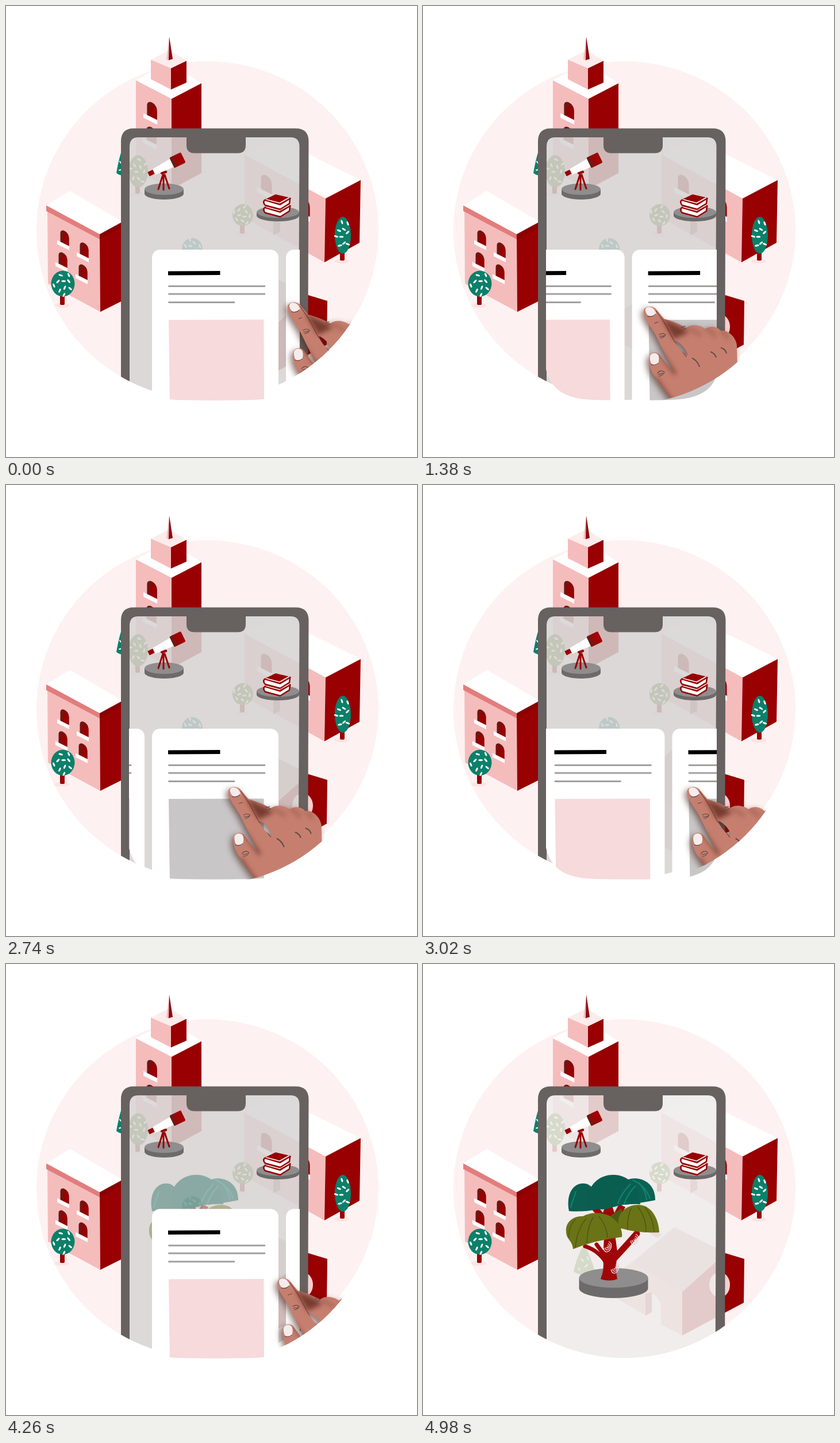
These frames come from a looping animation (715x783 px, 6.68 s). An HTML page with a canvas:

```html
<!DOCTYPE html>
<html lang="en">
<head>
<meta charset="utf-8">
<title>Campus on a phone</title>
<style>
html, body { margin: 0; width: 100%; height: 100%; overflow: hidden; background: #fff; }
canvas { display: block; width: 715px; height: 783px; }
</style>
</head>
<body>
<canvas id="stage" width="715" height="783"></canvas>
<script>
const W = 715, H = 783, LOOP = 6680;
const RED = '#980002', PINK = '#f5bcbc', TEAL = '#0b806a', OLIVE = '#3f6800', FRAME = '#676160', SKIN = '#c67f6f';
const stage = document.getElementById('stage').getContext('2d');
let g = stage;

// ---- helpers ----
const fill = (color, d, rule) => { g.fillStyle = color; g.fill(new Path2D(d), rule || 'nonzero'); };
const poly = (color, pts) => fill(color, 'M' + pts + 'Z');
const line = (color, width, d) => {
  g.strokeStyle = color; g.lineWidth = width; g.lineCap = g.lineJoin = 'round';
  g.stroke(new Path2D(d));
};
const oval = (color, x, y, rx, ry, rot = 0) => {
  g.fillStyle = color; g.beginPath(); g.ellipse(x, y, rx, ry, rot, 0, 7); g.fill();
};
const box = (color, x, y, w, h, r = 0) => {
  g.fillStyle = color; g.beginPath(); g.roundRect(x, y, w, h, r); g.fill();
};
const group = draw => { g.save(); draw(); g.restore(); };
const clipDisc = (dy = 0) => {
  g.beginPath(); g.ellipse(350.5, 390 + dy, 297.5, 294, 0, 0, 7); g.clip();
};
const layer = draw => {
  const c = document.createElement('canvas');
  c.width = W; c.height = H;
  g = c.getContext('2d'); draw(); g = stage;
  return c;
};
const rng = seed => () => (seed = (seed * 16807) % 2147483647) / 2147483647;

const quad = p => p < .5 ? 2 * p * p : 1 - 2 * (1 - p) ** 2;
const cubic = p => p < .5 ? 4 * p ** 3 : 1 - 4 * (1 - p) ** 3;
const smooth = p => p * p * (3 - 2 * p);
const prog = (t, a, b, ease = smooth) => ease(Math.min(1, Math.max(0, (t - a) / (b - a))));

// ---- scenery ----
function arch(x, y, s = 1) {
  group(() => {
    g.transform(s, .5 * s, 0, s, x, y);
    fill('#6f1510', 'M-7.5 11V-6A7.5 7.5 0 0 1 7.5 -6V11Z');
    fill(RED, 'M-3 11V-5Q-2 -9 3 -10Q7.5 -8 7.5 -4V11Z');
    box('#fff', -13, 9, 21, 7);
  });
}

function plant(color, x, y, rx, ry, foot, seed) {
  oval('#fde3e3', x - 2, foot + 1, 13, 4);
  box(RED, x - 5, y + ry - 4, 8, foot - y - ry + 4, 2);
  oval(color, x, y, rx, ry);
  const rand = rng(seed);
  for (let i = 0; i < 10; i++) {
    const a = i * 2.4 + seed, r = .9 * Math.sqrt((i + .5) / 10);
    const px = x + Math.cos(a) * rx * r, py = y + Math.sin(a) * ry * r;
    oval('#fff', px, py, 3.8, 1.6, rand() * 3);
  }
}

function tower() {
  poly(PINK, '226,129 288,161 288,318 226,286');
  poly(RED, '288,161 340,134 340,290 288,318');
  poly('#fff', '226,129 284,98 340,134 288,161');
  poly(PINK, '252,93 287,108 287,145 252,127');
  poly(RED, '287,108 314,95 314,133 287,145');
  poly('#fdecec', '252,93 284,77 314,95 287,108');
  poly(PINK, '284,54 279,93 284,95');
  poly('#8c0a10', '284,53 283,94 290,92');
  arch(254, 183, 1.15);
  arch(253, 226, 1.15);
}

function leftHouse() {
  poly(PINK, '72,352 163,400 164,531 73,482');
  poly(RED, '163,400 202,380 202,512 164,531');
  poly('#e27d7d', '70,346 163,396 163,405 70,356');
  poly('#8a0002', '163,396 202,375 202,384 163,405');
  poly('#fff', '70,346 111,321 202,374 163,396');
  [[102, 404], [136, 425], [99, 442], [134, 463]].forEach(p => arch(...p));
}

function rightHouse() {
  poly(PINK, '415,258 556,334 554,445 415,368');
  poly(RED, '556,334 617,302 615,411 554,445');
  poly('#fff', '415,258 472,228 526,257 617,302 556,334');
  arch(453, 311, 1.25);
  arch(519, 350, 1.25);
  poly('#b05a5a', '465,370 477,376 477,392 465,398');
}

function lowHouse() {
  poly('#d08080', '398,459 416,470 408,476 392,466');
  poly('#e6b0ae', '330,540 366,516 451,569 451,645 414,626 414,592 Q405,566 387,573 L387,610 332,578');
  poly('#a84848', '387,573 398,570 398,604 387,611');
  poly(RED, '451,569 526,502 559,512 558,588 451,645');
  poly('#cfa29e', '364,518 437,457 526,501 451,569');
  oval('#f8cfcf', 516, 557, 18, 22);
}

const scenery = layer(() => {
  oval('#fef1f1', 350.5, 390, 297.5, 294);
  tower();
  fill(TEAL, 'M207 236Q198 255 192 290Q202 298 220 292Z');
  line('#fff', 2, 'M198 270l3 4M197 285l4 -1');
  leftHouse();
  rightHouse();
  lowHouse();
  plant(TEAL, 99, 482, 20.5, 22.5, 519, 5);
  plant(TEAL, 586, 398, 14, 32, 442, 9);
  plant(OLIVE, 230, 287, 17, 28, 326, 3);
  plant(OLIVE, 412, 363, 18, 19, 395, 7);
  plant(TEAL, 324, 422, 18, 19, 450, 8);
  fill(OLIVE, 'M280 486Q266 512 262 534Q280 546 299 534Q292 508 280 486Z');
  line('#fff', 2, 'M275 512l4 4M282 526l4 -4M270 528l3 3M286 508l2 5');
});

const SCREEN = new Path2D('M214 660V243Q214 227 230 227H495Q511 227 511 243L510 690H214Z');

const frame = layer(() => {
  clipDisc();
  fill(FRAME, 'M200 700V235Q200 212.5 222 212.5H504Q526.5 212.5 526.5 235L525 700ZM215 700H508.5L510.5 244Q510.5 228 495 228H230Q215 228 215 244Z', 'evenodd');
  fill(FRAME, 'M314 226V242Q314 255.5 328 255.5H403Q417 255.5 417 242V226Z');
});

// ---- exhibits ----
function plinth(x, y, rx, ry, h) {
  fill('#6c6a6a', `M${x - rx} ${y}V${y + h}A${rx} ${ry} 0 0 0 ${x + rx} ${y + h}V${y}Z`);
  oval('#8f8d8d', x, y, rx, ry);
}

function telescope() {
  plinth(275, 318, 34, 10, 8);
  line(RED, 3, 'M273 293L265 318M274 293V319M276 293L284 317');
  line(RED, 4.5, 'M271 290L278 288');
  group(() => {
    g.translate(275, 279);
    g.rotate(-.45);
    box(RED, -30, -4, 12, 8, 1);
    poly('#fff', '-20,-5 17,-8 17,8 -20,6');
    const shade = g.createLinearGradient(15, 0, 26, 0);
    shade.addColorStop(0, '#5f2015');
    shade.addColorStop(1, '#a00306');
    box(shade, 15, -10, 22, 20, 2);
  });
}

function books() {
  plinth(473, 358, 37, 10, 6);
  [13, 0].forEach(dy => group(() => {
    g.translate(0, dy);
    poly('#fff', '450,337 477,345 494,335 494,343 477,353 450,346');
    line(RED, 2.5, 'M494 335L493 343L477 353L451 346Q446 341 450 337');
    poly(RED, '450,336 469,327 495,333 477,344');
    line('#fff', 1.5, 'M453 336L476 342L492 333');
    line(RED, 2, 'M450 337L477 345L495 334');
  }));
}

const bigTree = layer(() => {
  plinth(331.5, 545, 60, 17, 18);
  const bark = '#a00509';
  fill(bark, 'M309 547Q316 530 313 512L315 474L334 470L339 506Q333 525 338 547Q324 552 309 547Z');
  fill(bark, 'M288 420L301 417L313 432L317 420H329L333 432L341 417L352 422L340 446L334 478H314L306 440Z');
  line(bark, 7, 'M318 518Q306 498 282 490M316 506L302 487');
  line(bark, 11, 'M332 512Q348 495 372 468');
  fill('#0b5e50', 'M254 429C248 396 264 380 279 381C296 381 304 400 302 426Q280 431 254 429Z');
  fill('#0b6153', 'M340 395C345 375 362 369 380 374C398 380 404 395 404 410Q380 415 350 418Z');
  fill('#0a5e50', 'M285 414C286 385 305 366 331 366C360 366 378 390 378 417Q350 416 331 422Q300 433 285 414Z');
  line('#0e8672', 2, 'M361 382Q345 398 339 416M369 386Q355 400 350 417M376 380Q388 395 389 409M365 375Q386 384 395 407M266 395L257 422');
  fill('#4f5912', 'M322 440L345 424L352 452L342 462Z');
  fill('#6b7317', 'M261 495C260 480 249 478 249 465C247 447 263 437 278 438C292 430 310 431 324 437C340 446 348 462 346 474Q300 479 261 495Z');
  fill('#6b7317', 'M341 458C335 436 350 418 376 418C400 420 410 445 411 466Q374 468 341 458Z');
  line('#4f5912', 1.6, 'M284 442Q268 460 265 492M296 440Q286 456 285 484M306 438Q320 455 321 475M265 444Q253 455 254 474M362 424Q355 440 356 460M374 422Q388 440 388 464M386 422Q400 440 402 464');
  g.lineCap = 'round';
  [[321, 491], [334, 528], [368, 478]].forEach(([x, y]) => {
    for (let r = 2; r < 12; r += 3.5) {
      g.strokeStyle = '#f0cfcf'; g.lineWidth = 1.5;
      g.beginPath(); g.ellipse(x, y, r * .7, r, .3, -1.6, 2.6); g.stroke();
    }
  });
});

// ---- cards ----
const CARD_CLIP = new Path2D('M214 200H511V640C504 665 482 683 428 684Q362 685.5 300 684C246 683 222 665 214 630Z');

function card(x, y, tint) {
  group(() => {
    g.translate(x, y);
    box('#fff', 0, 0, 220, 300, 14);
    poly('#000', '28,37.5 118.5,37 118.5,44 28,44.5');
    [[63.5, 197], [77, 197], [91.5, 144]].forEach(([ly, end]) => line('#a2a0a0', 2.8, `M29.5 ${ly}H${end - 1}`));
    poly(tint, '29,122 194.5,121.5 195,270 31,270');
  });
}

// ---- hand ----
const HAND = new Path2D('M350 534C349 524 363 521 371 528L386 546C400 549 415 556 424 561C434 554 448 556 457 563C464 557 478 558 484 566C498 564 510 578 512 590L514 660L412 705C395 682 380 662 371 648C362 636 357 622 360 610C364 602 374 603 378 608C388 622 395 632 402 637C390 612 380 592 370 572C360 556 351 545 350 534ZM404 583C414 586 425 599 427 609C417 605 409 596 404 583Z');

const hand = (x, y) => group(() => {
  clipDisc(Math.min(10, y + 10));
  g.translate(x, y);
  group(() => {
    g.shadowColor = 'rgba(70,30,22,.6)';
    g.shadowBlur = 11; g.shadowOffsetX = -4; g.shadowOffsetY = 4;
    g.fillStyle = SKIN; g.fill(HAND, 'evenodd');
  });
  group(() => {
    g.clip(HAND, 'evenodd');
    g.filter = 'blur(4px)';
    fill('rgba(85,32,20,.7)', 'M380 543L418 561L428 571Q416 573 408 579L402 580Z');
    line('rgba(85,32,20,.4)', 4, 'M425 562Q440 566 448 574M458 563Q470 567 474 576M485 567Q493 571 496 579');
    line('rgba(85,32,20,.7)', 5, 'M379 604L404 640M372 650Q388 678 412 702');
    g.filter = 'none';
    line('rgba(95,40,28,.6)', 1.5, 'M372 532L386 552L403 584L424 611');
  });
  fill('#f6ecec', 'M353 531C352 524 362 523 367 528Q372 534 372 538Q364 543 358 540Q354 537 353 531Z');
  fill('#f6ecec', 'M361 610C364 603 374 604 376 610Q378 618 374 625Q367 627 363 623Q360 616 361 610Z');
  const crease = '#5d4b49';
  line(crease, 1.2, 'M357 541Q365 543 371 537M363 625Q370 627 375 623M369 553L375 551M377 573Q383 569 388 573Q386 578 379 579M378 576L386 575M374 640Q379 633 386 638Q385 643 377 645M376 642L383 640M415 561L422 558M418 564L424 562');
  line(crease, 2, 'M435 614Q443 618 447 628M467 603Q474 606 476 612M485 596Q492 598 494 605');
});

// ---- frame by time ----
function draw(t) {
  const swipe = 227 * prog(t, 1090, 1640) + 6 * prog(t, 1660, 2100)
    - 228 * prog(t, 2740, 3140) - 5 * prog(t, 3160, 3640);
  const drop = 265 * prog(t, 4220, 4980);
  const reach = prog(t, 980, 1640, cubic);
  const hx = 140 * (1 - reach) + 117 * prog(t, 2480, 3140, quad) + 5 * prog(t, 3160, 3640);
  const hy = -10 * (1 - reach) + 225 * prog(t, 4060, 4980, quad);

  g.clearRect(0, 0, W, H);
  g.drawImage(scenery, 0, 0);
  group(() => {
    clipDisc();
    g.clip(SCREEN);
    g.fillStyle = 'rgba(239,237,236,.86)';
    g.fillRect(200, 200, 330, 500);
    g.fillStyle = `rgba(0,0,0,${.09 * (1 - prog(t, 4060, 4980, p => p ** 2.2))})`;
    g.fillRect(200, 200, 330, 500);
    telescope();
    books();
    g.globalAlpha = prog(t, 4160, 4400);
    g.drawImage(bigTree, 0, 0);
  });
  g.drawImage(frame, 0, 0);
  if (drop < 265) group(() => {
    g.clip(CARD_CLIP);
    card(254 - swipe, 423 + drop, '#f7dadb');
    card(487 - swipe, 423 + drop, '#c8c6c7');
  });
  if (t < 4980) hand(hx, hy);
}

const start = performance.now();
function tick() {
  draw((performance.now() - start) % LOOP);
  requestAnimationFrame(tick);
}
tick();
</script>
</body>
</html>
```
